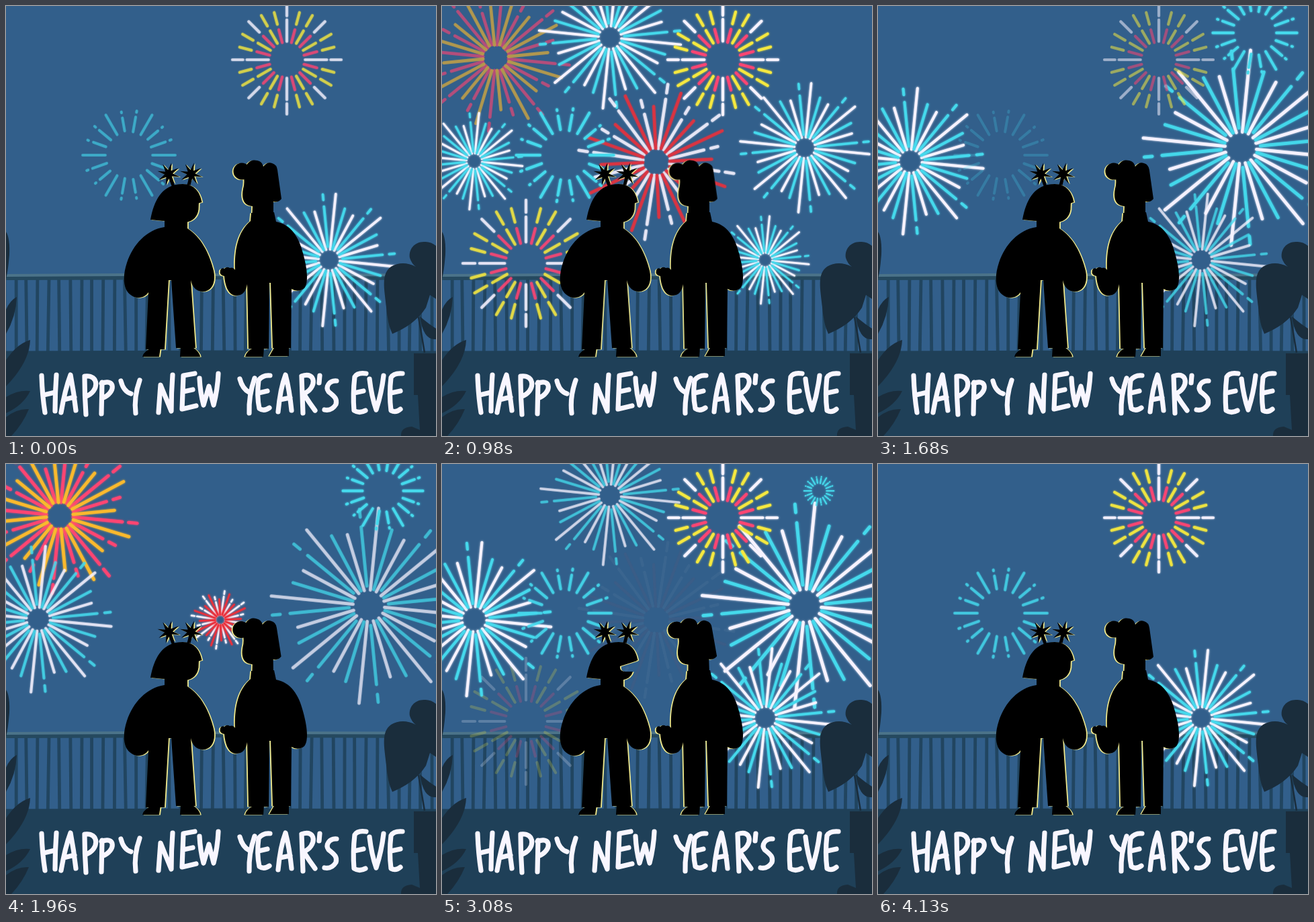
These frames come from a looping animation (640x640 px, 4.27 s). An HTML page with a canvas:

```html
<!DOCTYPE html>
<html lang="en">
<head>
<meta charset="utf-8">
<title>Happy New Year's Eve</title>
<style>
html, body { margin: 0; width: 100%; height: 100%; overflow: hidden; background: #325f8b; }
svg, canvas { position: absolute; left: 0; top: 0; width: 100%; height: 100%; display: block; }
.rim { fill: #f0e98c; }
.letters { fill: none; stroke: #f8f6ff; stroke-width: 7.2; stroke-linecap: round; stroke-linejoin: round; }
</style>
</head>
<body>
<svg viewBox="0 0 640 640">
  <rect width="640" height="640" fill="#325f8b"/>
  <g id="bars" stroke="#214560" stroke-width="4.8"></g>
  <path d="M0 404 L300 403 L640 404" stroke="#25495f" stroke-width="8" fill="none"/>
  <path d="M0 401 L170 400 L640 400.500" stroke="#4b7389" stroke-width="4" fill="none"/>
  <path d="M0 513.500 L320 512.500 L640 513.500 V640 H0Z" fill="#1f4058"/>
</svg>
<canvas id="sky" width="640" height="640"></canvas>
<svg viewBox="0 0 640 640">
  <defs>
    <path id="star" d=""/>
    <g id="woman">
      <use href="#star" x="242" y="250"/>
      <use href="#star" x="275.500" y="250"/>
      <path d="M242 252 L249 270 M275 252 L270 270" stroke="#000" stroke-width="3"/>
      <path d="M215 318 C221 286 234 265 263 265 C281 265 289 278 291.500 292 L285 294 L262 300 L258 320 Q238 321 215 318Z"/>
      <path id="shut" d="M255 285 L287 291 L286.500 303 Q284 319 268 322 L255 320Z"/>
      <path id="open" d="M240 285 L286 289 L290 293 L265 301 Q264 309 273 309 L284 309 Q281 320 267 322 L240 322Z"/>
      <path d="M236 316 H270 V331 C290 343 303 369 309 394 C313 413 305 425 293 425 C283 425 277 418 275 408
        L282 509 H253 L246 408 H242 L236 511 H208 L212 426 C207 434 196 437 187 431 C174 423 173 403 180 382 C189 355 209 333 236 329Z"/>
      <path d="M203 522 Q205 513 220 508 H230 L228 522Z M259 522 L260 506 H275 Q288 514 289 522Z"/>
    </g>
    <g id="man">
      <g id="head">
        <circle cx="351" cy="246" r="12.500"/>
        <path d="M353 250 C358 230 366 228 374 230 Q381 231 383 239 Q389 231 396 234 Q403 236 404 244 L410 287 Q405 293 398 291
          L398 318 H366 L367 298 C354 297 350 287 353 272 Q356 262 353 250Z"/>
      </g>
      <path d="M365 308 L399 307 L402 321 C424 325 436 344 442 368 C448 389 451 412 444 420 Q435 427 425 421 L424 509 H397 L394 412 H392
        L391 510 H361 L359 414 Q356 432 341 431 C330 429 326 415 325 402 Q317 401 319 393 Q321 389 325 391 Q329 387 333 390 Q338 388 341 393
        C340 365 344 337 364 320Z"/>
      <path d="M356 522 Q358 513 370 508 H384 L383 522Z M392 521 L400 507 H421 L421 521Z"/>
    </g>
  </defs>
  <g id="glow">
    <use href="#woman" class="rim" x="1.800" y="0.600"/>
    <use href="#man" class="rim" x="-1.800" y="0.600"/>
  </g>
  <use href="#woman"/>
  <use href="#man"/>

  <g fill="#1a2d3c">
    <path d="M0 336 Q6 345 5 370 Q3 395 0 406Z"/>
    <path d="M0 452 Q6 438 16 433 Q15 462 0 488Z"/>
    <path d="M0 527 Q16 503 36 497 Q35 530 0 566Z"/>
    <path d="M0 582 Q18 571 36 573 Q26 594 0 606Z"/>
    <path d="M0 612 Q16 599 34 600 Q25 622 8 640 H0Z"/>
    <path d="M640 357 Q632 350 622 351 C608 351 599 362 601 375 Q604 384 610 388 Q590 378 573 388 C558 399 563 420 566 448
      Q568 474 575 488 C594 480 613 468 625 449 L631 430 L640 436Z"/>
    <path d="M640 496 Q621 498 616 462 Q630 474 640 480Z"/>
    <path d="M607 517 H640 V579 H607Z M613 579 H640 V640 H588 Q587 627 604 626 L616 631Z"/>
    <path d="M614 463 L623 516" stroke="#1a2d3c" stroke-width="2.500"/>
  </g>

  <g class="letters" role="img" aria-label="Happy New Year's Eve">
    <path d="M53 550 Q54 580 58 605 M75 549 Q73 576 73 603 M56 579 L73 575"/>
    <path d="M82 605 Q88 570 96 549 Q101 575 104 602 M86 586 L102 582"/>
    <path d="M117 552 Q117 580 119 608 M117 551 C139 548 139 574 119 581"/>
    <path d="M143 560 L142 607 M142 562 C162 553 165 575 143 584"/>
    <path d="M171 558 Q175 574 186 577 M199 557 Q190 582 193 606"/>
    <path d="M227 605 L230 564 Q238 584 246 603 Q246 575 248 549"/>
    <path d="M281 547 L264 550 L262 600 L283 595 M264 574 L278 571"/>
    <path d="M288 554 Q289 575 294 594 L302 566 L309 594 Q315 570 316 547"/>
    <path d="M348 555 Q352 570 362 575 M370 554 Q361 580 362 606"/>
    <path d="M393 550 Q382 549 376 557 Q373 580 377 599 Q384 604 392 598 M376 576 L389 573"/>
    <path d="M405 604 Q408 570 416 549 Q422 572 425 602 M408 586 L423 583"/>
    <path d="M440 551 L442 606 M440 551 C462 543 463 569 443 577 Q451 590 460 602"/>
    <path d="M467 550 L466 561"/>
    <path d="M492 558 C481 557 475 567 480 574 C487 580 494 584 491 593 Q485 603 474 601"/>
    <path d="M536 547 Q523 545 519 552 Q516 578 518 602 Q526 607 535 602 M518 576 L532 573"/>
    <path d="M541 555 Q544 581 551 601 Q559 576 562 550"/>
    <path d="M590 547 Q577 546 573 553 Q570 578 573 602 Q580 606 587 600 M573 576 L587 573"/>
  </g>
</svg>
<script>
const LOOP = 4270, CYCLE = 1750, TICK = 70;
const WHITE = '#f7f3ff', CYAN = '#45d9ec', RED = '#e9303b', PINK = '#ff4572', GOLD = '#f9b92d', YELLOW = '#f5e83f';
const $ = id => document.getElementById(id);
const ctx = $('sky').getContext('2d');
const clamp = v => Math.max(0, Math.min(1, v));

// A wheel repeats a few spokes around the circle. A spoke is a list of
// dashes [from, to, colour], with radii relative to the burst.
function wheel(n, turn, spokes) {
  const out = [];
  for (let k = 0; k < n; k++) {
    const a = (turn + k * 360 / n) * Math.PI / 180;
    for (const [from, to, c] of spokes[k % spokes.length]) out.push([a, from, to, c]);
  }
  return out;
}

const blue = wheel(32, 5.7, [
  [[0.16, 0.99, WHITE]],
  [[0.17, 0.8, CYAN]],
  [[0.16, 0.75, WHITE]],
  [[0.2, 0.8, CYAN], [0.9, 0.98, CYAN]]
]);
const warm = (turn, a, b) => wheel(32, turn, [
  [[0.17, 0.8, a], [0.88, 0.99, a]],
  [[0.18, 0.92, b]],
  [[0.18, 0.62, a], [0.71, 0.8, a]],
  [[0.17, 0.7, b]]
]);
const ring = wheel(18, 0, [
  [[0.5, 0.98, CYAN]],
  [[0.52, 0.8, CYAN], [0.91, 0.93, CYAN]],
  [[0.5, 0.82, CYAN], [0.92, 0.95, CYAN]]
]);
const confetti = wheel(24, 0, [
  [[0.33, 0.72, WHITE], [0.79, 0.98, WHITE]],
  [[0.32, 0.56, PINK], [0.66, 0.88, YELLOW]],
  [[0.34, 0.6, YELLOW], [0.7, 0.92, YELLOW]],
  [[0.33, 0.6, PINK], [0.7, 0.97, WHITE]],
  [[0.34, 0.6, YELLOW], [0.7, 0.92, YELLOW]],
  [[0.32, 0.56, PINK], [0.66, 0.88, YELLOW]]
]);

// fade: ages at which the burst starts and stops fading; early: also seen before the first cycle
const bursts = [
  { x: 80, y: 77, r: 117, w: 4.6, born: 0, grow: 200, fade: [630, 1210], rays: warm(5.6, PINK, GOLD) },
  { x: 250, y: 47, r: 110, w: 3.7, born: 420, grow: 350, fade: [700, 1180], rays: blue },
  { x: 319, y: 232, r: 124, w: 4.6, born: 150, grow: 350, fade: [700, 1190], rays: warm(8.5, WHITE, RED) },
  { x: 125, y: 383, r: 101, w: 4.2, born: 215, grow: 350, fade: [600, 1180], rays: confetti },
  { x: 48, y: 231, r: 116, w: 4, born: 850, grow: 350, fade: [950, 1500], rays: blue },
  { x: 540, y: 211, r: 155, w: 4.7, born: 850, grow: 350, fade: [800, 1420], rays: blue },
  { x: 561, y: 40, r: 64, w: 3.8, born: 1270, grow: 350, fade: [750, 1050], rays: ring },
  { x: 183, y: 222, r: 74, w: 4, born: 650, grow: 120, fade: [560, 1100], early: true, rays: ring },
  { x: 418, y: 80, r: 87, w: 4.2, born: 700, grow: 350, fade: [630, 1150], early: true, rays: confetti },
  { x: 481, y: 378, r: 105, w: 3.7, born: 850, grow: 350, fade: [670, 1050], early: true, rays: blue }
];

function drawBurst(b, age) {
  const alpha = 1 - clamp((age - b.fade[0]) / (b.fade[1] - b.fade[0]));
  if (age <= 0 || alpha <= 0) return;
  const grown = 1 - (1 - clamp(age / b.grow)) ** 2;
  const size = b.r * (0.06 + 0.94 * grown) * (1 - 0.05 * clamp((age - 480) / 140));
  ctx.globalAlpha = alpha;
  ctx.lineWidth = b.w * (0.35 + 0.65 * grown);
  for (const colour of new Set(b.rays.map(r => r[3]))) {
    ctx.beginPath();
    for (const [a, from, to, c] of b.rays) {
      if (c !== colour) continue;
      const dx = Math.cos(a) * size, dy = Math.sin(a) * size;
      ctx.moveTo(b.x + dx * from, b.y + dy * from);
      ctx.lineTo(b.x + dx * to, b.y + dy * to);
    }
    ctx.strokeStyle = ctx.shadowColor = colour;
    ctx.shadowBlur = 3 * alpha;
    ctx.stroke();
  }
}

function rimLight(u) {
  if (u < 0) return 1;
  const p = u % CYCLE;
  return p < 850 ? 1 - clamp((p - 490) / 250) : clamp((p - 850) / 140);
}

const talking = [[490, 840], [2310, 2660], [2940, 3220]];

function draw(t) {
  const u = t >= 2 * CYCLE ? t - LOOP : t;
  ctx.clearRect(0, 0, 640, 640);
  ctx.lineCap = 'round';
  for (const b of bursts) {
    const births = [b.born, b.born + CYCLE];
    if (b.early) births.push(b.born - 1540);
    for (const born of births) drawBurst(b, u - born);
  }
  $('glow').setAttribute('opacity', rimLight(u));
  const open = talking.some(([from, to]) => t >= from && t < to);
  $('open').style.display = open ? '' : 'none';
  $('shut').style.display = open ? 'none' : '';
  const nod = u < 0 ? 0 : -1 + Math.cos(u / CYCLE * Math.PI * 4);
  $('head').setAttribute('transform', `rotate(${nod} 382 312)`);
}

function buildScene() {
  let bars = '';
  for (let x = -2, k = 0; x < 640; x += 16.3, k++) {
    const top = x + Math.sin(k * 2.1), foot = x + Math.sin(k * 1.3);
    bars += `<path d="M${top} 404 L${foot} 514"/>`;
  }
  $('bars').innerHTML = bars;
  let d = '';
  for (let k = 0; k < 16; k++) {
    const r = k % 2 ? 6 : 17, a = k * Math.PI / 8 + 0.25;
    d += (k ? 'L' : 'M') + r * Math.cos(a) + ' ' + r * Math.sin(a);
  }
  $('star').setAttribute('d', d + 'Z');
}

function frame() {
  let t = Math.floor(performance.now() % LOOP / TICK) * TICK;
  // two drawings are held for a double beat
  if (t === 420) t = 350;
  if (t === 4200) t = 4130;
  draw(t);
  requestAnimationFrame(frame);
}

buildScene();
frame();
</script>
</body>
</html>
```
